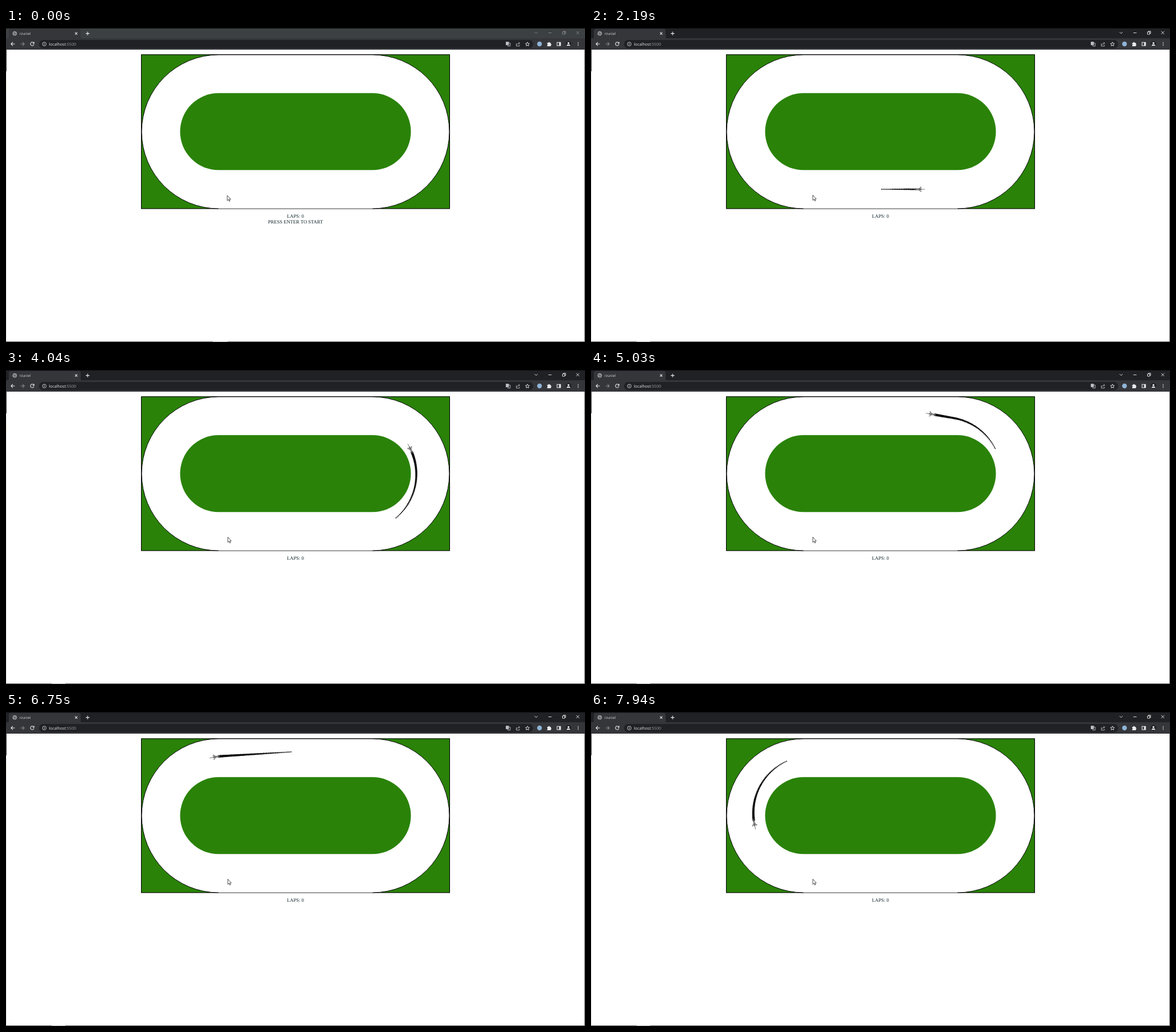
An HTML page that plays this animation: 1016 px wide and 551 px high, repeating every 8000 ms.

```html
<!DOCTYPE html>
<html lang="en">
<head>
<meta charset="utf-8">
<title>rzurzel</title>
<style>
  html, body { margin: 0; width: 100%; height: 100%; overflow: hidden; background: #fff; }
  svg { display: block; width: 100%; height: 100%; }
  text { text-rendering: geometricPrecision; }
  .ui { font-family: "Open Sans", sans-serif; }
  .page { font-family: "Liberation Serif", serif; font-size: 8.6px; fill: #0c2128; text-anchor: middle; }
  .line { fill: none; stroke: #e8eaed; stroke-width: 1.1; }
</style>
</head>
<body>
<svg viewBox="0 0 1016 551" xmlns="http://www.w3.org/2000/svg">
  <rect width="1016" height="551" fill="#fff"/>

  <!-- browser frame -->
  <rect id="bar" width="1016" height="19"/>
  <rect width="1016" height="1" fill="#0c0d0e"/>
  <path d="M2 18.5Q5 18.5 5 15V5Q5 1.5 8.500 1.500H127.500Q131 1.500 131 5V15Q131 18.500 134 18.500Z" fill="#35363a"/>
  <rect y="18" width="1016" height="20" fill="#35363a"/>
  <rect x="58" y="21" width="867" height="14.500" rx="7.200" fill="#202124"/>
  <g fill="none" stroke="#aeb1b5" stroke-width=".8">
    <circle cx="15.300" cy="9.600" r="3.500" fill="#8e9195"/>
    <path d="M12.500 8.500l2.500 1 1-2M14.500 12.500l1-1.800 2.500-.5" stroke="#35363a"/>
  </g>
  <text class="ui" x="23.800" y="11.800" font-size="6.100" fill="#dfe1e5">rzurzel</text>
  <path class="line" d="M121.200 7.700l4 4m0-4l-4 4M140 9.600h6.400M143.200 6.400v6.400"/>
  <path class="line" d="M15.500 28H9M12 24.800L8.800 28l3.200 3.200"/>
  <path class="line" d="M25.500 28H32M29 24.800l3.200 3.200-3.200 3.200" style="stroke:#85888c"/>
  <path class="line" d="M48.600 26.200A3.100 3.100 0 1 0 49 28.700M49.200 24.500v2.500h-2.600"/>
  <circle cx="67.200" cy="28.200" r="3.300" class="line" style="stroke-width:.8"/>
  <path class="line" d="M67.200 27.600v2.300M67.200 25.900v.9" style="stroke-width:.9"/>
  <text class="ui" x="75.200" y="30.600" font-size="7.100" fill="#e8eaed">localhost<tspan fill="#9aa0a6">:5500</tspan></text>

  <!-- toolbar icons -->
  <g class="line" style="stroke:#bdc1c6;stroke-width:.9">
    <rect x="877.500" y="24.700" width="4.500" height="5" fill="#bdc1c6"/>
    <path d="M882.500 26.500h2.300v5.300h-4.300v-1.500M879 27.200h1.700" />
    <path d="M895.500 27v4.800h5.500v-2M897 29.500q.4-2.800 4-2.800M899.500 24.700l2 2-2 2"/>
    <path d="M915 24.800l1 2.300 2.500.2-1.900 1.700.6 2.500-2.200-1.300-2.200 1.300.6-2.500-1.900-1.700 2.500-.2z" stroke="#e8eaed"/>
  </g>
  <circle cx="936.200" cy="28" r="4.200" fill="#8fb4d8"/>
  <path d="M949.700 26h1.800a1.300 1.300 0 0 1 2.600 0h2v2a1.300 1.300 0 0 1 0 2.500v1.500h-6.400v-2a1.200 1.200 0 0 0 0-2.200z" fill="#e8eaed"/>
  <path class="line" d="M967 25.200h6v5.800h-6z"/>
  <rect x="970.500" y="25" width="2.800" height="6.200" fill="#e8eaed"/>
  <circle cx="987" cy="28" r="5" fill="#202124"/>
  <path d="M983.800 31.200q0-2.400 3.200-2.400t3.200 2.400zM985.300 26.500a1.700 1.700 0 1 0 3.400 0a1.700 1.700 0 1 0-3.400 0" fill="#e8eaed"/>
  <g fill="#e8eaed"><circle cx="1004" cy="25.500" r=".8"/><circle cx="1004" cy="28" r=".8"/><circle cx="1004" cy="30.500" r=".8"/></g>
  <path id="win" fill="none" stroke-width=".9" d="M927.500 7l2.700 2.700 2.700-2.700M951.700 8.500h5.600M976.500 7h4v4h-4zM978 7V5.600h4v4h-1.500M1000.700 5.700l5.200 5.200m0-5.200l-5.200 5.200"/>

  <!-- window edges -->
  <path d="M.5 38V76" stroke="#333"/>
  <path d="M.5 76V551" stroke="#dcdcdc"/>
  <path d="M.5 93v16" stroke="#e6dcc4"/>
  <path d="M1015.500 38V551M0 550.500H1016" stroke="#55575a"/>
  <path id="notch" stroke="#b4b6b8"/>

  <!-- track -->
  <rect x="237.500" y="46.800" width="541" height="270.200" fill="#2a8208" stroke="#000" stroke-width="1.100"/>
  <path d="M373 47A135 135 0 0 0 373 317H643A135 135 0 0 0 643 47Z" fill="#fff"/>
  <path d="M643 317A135 135 0 0 0 643 47H373A135 135 0 0 0 373 317" fill="none" stroke="#000"/>
  <path d="M373 317H643" stroke="#777" stroke-width=".9"/>
  <rect x="305.500" y="114.300" width="405" height="135" rx="67.500" fill="#2a8208"/>

  <text class="page" x="508" y="333">LAPS: 0</text>
  <text class="page" id="prompt" x="508" y="342.600">PRESS ENTER TO START</text>

  <g id="trail" fill="#0b0b0b"></g>
  <g id="bike" fill="none" stroke-linecap="round">
    <path d="M-8 0H2" stroke="#555" stroke-width="2.800"/>
    <path d="M-4 0L2.500-3.700M-4 0L2.500 3.700M-1 0L1-4M-1 0L1 4" stroke="#777" stroke-width="1.100"/>
    <path d="M1 0H8.500" stroke="#8a8a8a" stroke-width="1.100"/>
    <path d="M-6 0H-2" stroke="#aaa" stroke-width=".9"/>
  </g>
  <path id="cursor" d="M0 0V9.200L2.100 7.300 3.600 10.400 4.900 9.800 3.500 6.800H6.200Z" fill="#fff" stroke="#222" stroke-width=".8" stroke-linejoin="round"/>
</svg>
<script>
const LOOP = 8000, FRAME = 66.06, START = 1730;
const STEP = 2.686, DOTS = 48, RADIUS = 100, LEAD = 8;
const $ = id => document.getElementById(id);

// Route from the start line: [straight length, left turn in degrees]
const route = [[110, 170], [72.5, 9], [40, 4.5], [124, 120]];

function move(p, length, turn) {
  if (!turn) return { x: p.x + length * Math.cos(p.a), y: p.y - length * Math.sin(p.a), a: p.a };
  const a = p.a + length / RADIUS;
  return {
    x: p.x + RADIUS * (Math.sin(a) - Math.sin(p.a)),
    y: p.y + RADIUS * (Math.cos(a) - Math.cos(p.a)),
    a
  };
}

function pointAt(dist) {
  let p = { x: 510, y: 283, a: 0 };
  for (const [straight, deg] of route) {
    for (const [length, turn] of [[straight, false], [deg * Math.PI / 180 * RADIUS, true]]) {
      const d = Math.min(dist, length);
      p = move(p, d, turn);
      dist -= d;
      if (dist <= 0) return p;
    }
  }
  return p;
}

const dots = Array.from({ length: DOTS }, (_, i) => {
  const c = document.createElementNS("http://www.w3.org/2000/svg", "circle");
  c.setAttribute("r", 0.95 + i * 0.029);
  return $("trail").appendChild(c);
});

const mix = (a, b, k) => `rgb(${a.map((v, i) => Math.round(v + (b[i] - v) * k))})`;

function drawWindow(t) {
  const k = t < 1190 ? 0 : Math.min(4, Math.floor((t - 1190) / 66) + 1) / 4;
  $("bar").setAttribute("fill", mix([60, 64, 67], [32, 33, 36], k));
  $("win").setAttribute("stroke", mix([135, 138, 141], [240, 240, 240], k));
  $("cursor").setAttribute("transform", `translate(${388.2 + k} ${293.8 - k * 0.6})`);
  $("notch").setAttribute("d", k ? "M80 550.500h24" : "M363 550.500h26");
}

function drawRace(t) {
  const on = t >= START;
  $("prompt").style.display = on ? "none" : "";
  $("trail").style.display = $("bike").style.display = on ? "" : "none";
  if (!on) return;

  const now = START + Math.floor((t - START + 10) / FRAME) * FRAME;
  const n = Math.max(0, Math.round((now - 1760) / 20));
  const first = Math.max(0, n - DOTS + 1);
  dots.forEach((dot, i) => {
    const seen = first + i <= n;
    dot.style.display = seen ? "" : "none";
    if (!seen) return;
    const p = pointAt((first + i) * STEP);
    dot.setAttribute("cx", p.x);
    dot.setAttribute("cy", p.y);
  });
  const b = pointAt(n * STEP + LEAD);
  $("bike").setAttribute("transform", `translate(${b.x} ${b.y}) rotate(${-b.a * 180 / Math.PI})`);
}

const begin = performance.now();
function tick() {
  const t = (performance.now() - begin) % LOOP;
  drawWindow(t);
  drawRace(t);
  requestAnimationFrame(tick);
}
tick();
</script>
</body>
</html>
```
